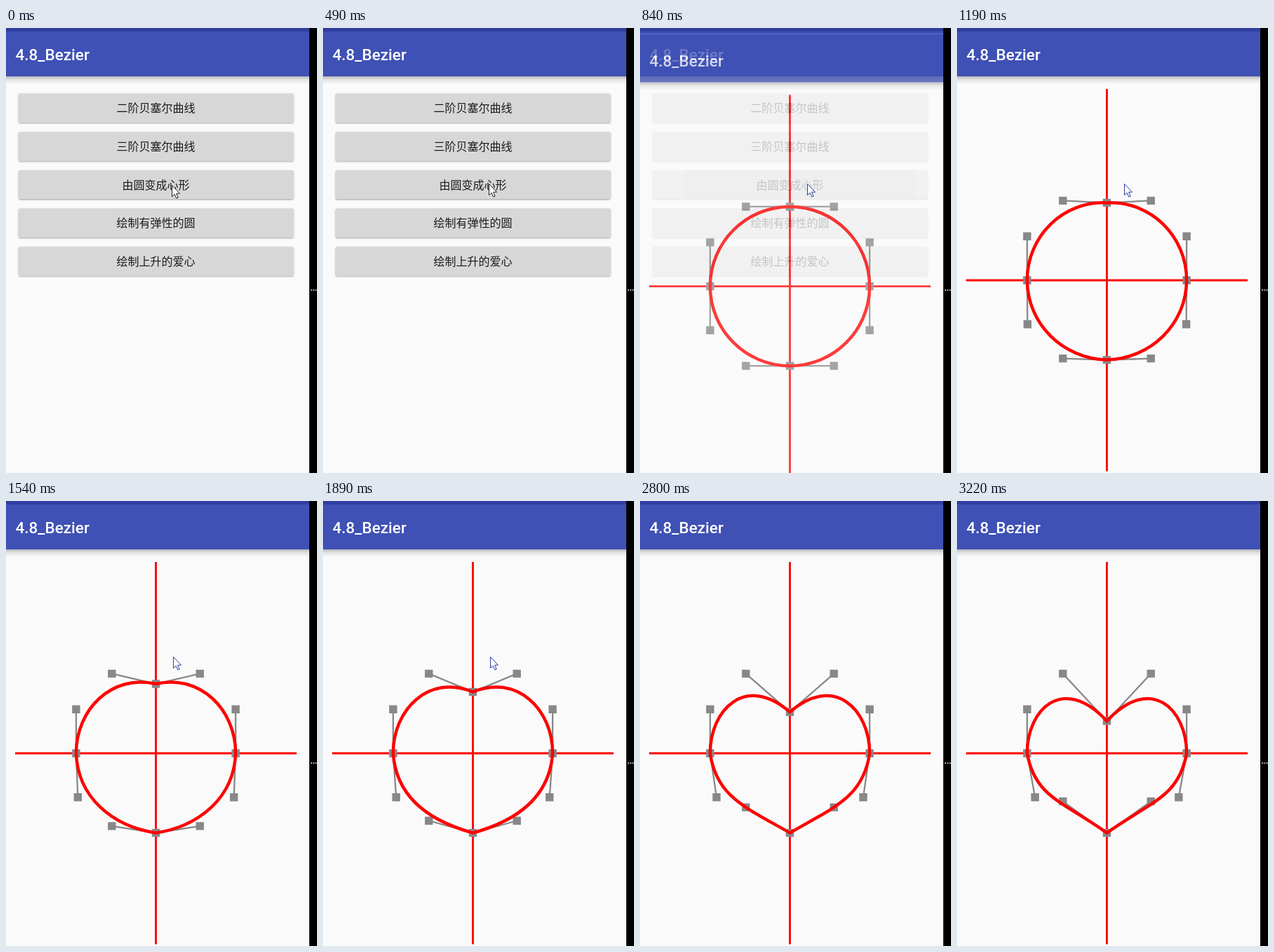
Animation of 443x635 px, one loop 3.71 s. Source, as an HTML page:

```html
<!DOCTYPE html>
<html lang="zh-CN">
<head>
<meta charset="utf-8">
<title>Bezier</title>
<style>
html, body { margin: 0; width: 100%; height: 100%; overflow: hidden; background: #fafafa; }
svg { display: block; width: 443px; height: 635px; }
.title { font: 500 22.5px Roboto, sans-serif; fill: #fff; }
.label { font: 16px "Noto Sans CJK SC", "Noto Sans CJK", sans-serif; fill: #1c1c1c; text-anchor: middle; }
</style>
</head>
<body>
<svg viewBox="0 0 443 635">
  <defs>
    <linearGradient id="shade" x2="0" y2="1">
      <stop offset="0" stop-opacity=".27"/>
      <stop offset=".4" stop-opacity=".1"/>
      <stop offset="1" stop-opacity="0"/>
    </linearGradient>
    <filter id="lift" x="-2%" y="-10%" width="104%" height="125%">
      <feDropShadow dx="0" dy="1" stdDeviation=".9" flood-opacity=".4"/>
    </filter>
    <clipPath id="pressed"><rect x="18" y="203" width="391.5" height="41.5" rx="2"/></clipPath>
    <g id="frame">
      <path d="M0 0H432V635H0z" fill="#fafafa"/>
      <path d="M0 69H432V80H0z" fill="url(#shade)"/>
      <path d="M0 0H432V69H0z" fill="#3f51b5"/>
      <text class="title" x="13.5" y="46">4.8_Bezier</text>
    </g>
  </defs>

  <g id="menu">
    <use href="#frame"/>
    <g id="buttons"></g>
    <circle id="ripple" fill="#cfd0cf" clip-path="url(#pressed)"/>
    <g id="labels" class="label"></g>
  </g>

  <g id="demo">
    <use href="#frame"/>
    <path d="M13 360H414M213.5 87V632.5" stroke="#f00" stroke-width="2.85"/>
    <path id="points" fill="#888"/>
    <path id="handles" stroke="#888" stroke-width="2.3"/>
    <path id="curve" fill="none" stroke="#f00" stroke-width="4.5"/>
  </g>

  <path d="M0 0H432V5H0z" fill="#303f9f"/>
  <path id="cursor" d="M.5 .5V16.5L4.2 13.2L6.8 19L9.2 18L6.6 12.2H11.5z" fill="#fff"/>
  <path d="M432 0H443V635H432z"/>
  <path d="M434 374H443" stroke="#ddd" stroke-width="1.6" stroke-dasharray="2 1.3"/>
</svg>
<script>
const LOOP = 3710, STEP = 70, END = 3220;
const CX = 213.5, CY = 360, R = 113.6, C = R * 0.5519;
const $ = id => document.getElementById(id);

["二阶贝塞尔曲线", "三阶贝塞尔曲线", "由圆变成心形", "绘制有弹性的圆", "绘制上升的爱心"].forEach((text, i) => {
  const y = 93.5 + i * 54.7;
  $("buttons").innerHTML +=
    `<rect x="18" y="${y}" width="391.5" height="41.2" rx="2" fill="#d6d7d6" filter="url(#lift)"/>`;
  $("labels").innerHTML += `<text x="213.5" y="${y + 26.8}">${text}</text>`;
});

// time, x, y of the pointer tip
const track = [
  [0, 236, 224], [490, 236, 222], [840, 238, 222], [2030, 246, 262], [2100, 274, 374],
  [2170, 316, 507], [2240, 343, 563], [2310, 362, 598], [2380, 386, 624], [2450, 400, 700]
];

function drawHeart(t) {
  const s = t - 1190;
  const d = t < 1120 ? 0 : 3 + 0.03343 * s - 8.1e-7 * s * s;
  const side = d / 6, lift = d * 2 / 3;
  // each anchor sits between its incoming and outgoing control point
  const nodes = [
    [[-C, -R], [0, d - R], [C, -R]],
    [[R, -C], [R, 0], [R - side, C]],
    [[C, R - lift], [0, R], [-C, R - lift]],
    [[side - R, C], [-R, 0], [-R, -C]]
  ].map(node => node.map(([x, y]) => [CX + x, CY + y]));

  $("points").setAttribute("d", nodes.flat()
    .map(([x, y]) => `M${x - 5.7} ${y - 5.7}h11.4v11.4h-11.4z`).join(""));
  $("handles").setAttribute("d", nodes.map(([a, p, b]) => `M${a}L${p}L${b}`).join(""))
  $("handles").setAttribute("fill", "none");
  $("curve").setAttribute("d", `M${nodes[0][1]}` + nodes.map((node, i) => {
    const next = nodes[(i + 1) % 4];
    return `C${node[2]} ${next[0]} ${next[1]}`;
  }).join("") + "z");
}

function draw(now) {
  const t = Math.min(END, Math.floor(now % LOOP / STEP) * STEP);

  const grow = Math.max(0, (t - 490) / 280);
  $("ripple").setAttribute("r", 133 * grow);
  $("ripple").setAttribute("cx", 236 - 7 * grow);
  $("ripple").setAttribute("cy", 223.5);

  const left = 1 - Math.min(1, Math.max(0, (t - 780) / 200));
  $("demo").setAttribute("opacity", 1 - left ** 4);
  $("demo").setAttribute("transform", `translate(0 ${51 * left ** 5})`);
  drawHeart(t);

  const [, x, y] = track.findLast(p => p[0] <= t);
  $("cursor").setAttribute("transform", `translate(${x} ${y})`);
  $("cursor").setAttribute("stroke", t >= 840 && t < 2030 ? "#2a3a9e" : "#222");
  requestAnimationFrame(draw);
}

const start = performance.now();
requestAnimationFrame(now => draw(Math.max(0, now - start)));
// keep later frames on the same clock
const clock = draw;
draw = now => clock(Math.max(0, performance.now() - start));
</script>
</body>
</html>
```
